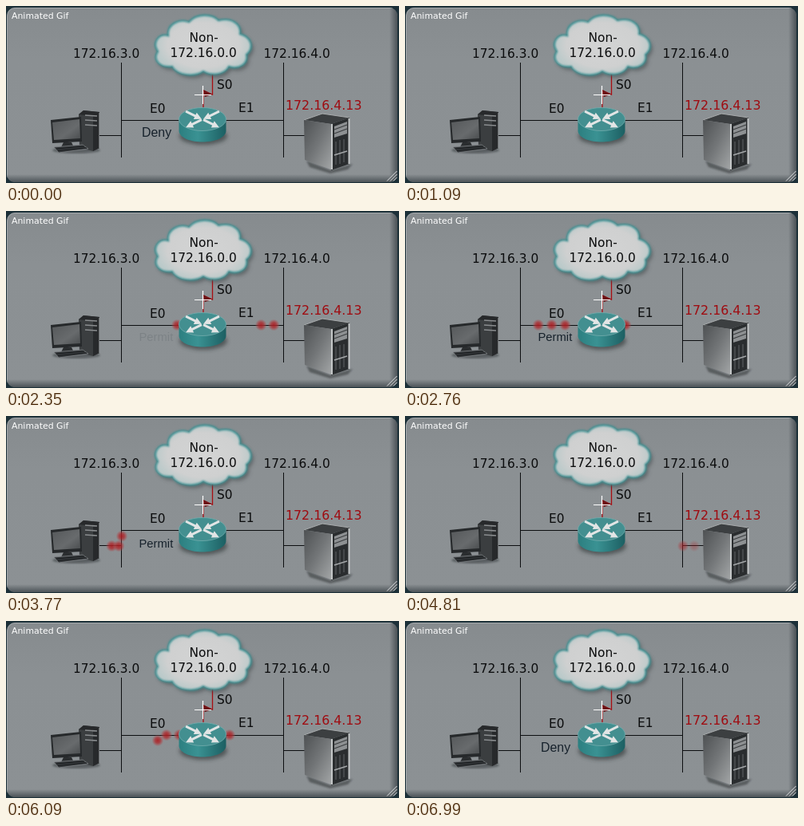
These frames come from a looping animation (492 px wide and 222 px high, 7.29 s). An HTML page:

```html
<!DOCTYPE html>
<html lang="en">
<head>
<meta charset="utf-8">
<title>Access list on E0</title>
<style>
  html, body { margin: 0; width: 100%; height: 100%; overflow: hidden; background: #1c3038; }
  svg { display: block; width: 492px; height: 222px; }
  text { font-family: "DejaVu Sans", Verdana, sans-serif; font-size: 15.4px; fill: #0c0d0e; }
  .verdict { font-family: "Liberation Sans", Arial, sans-serif; font-size: 15.9px; fill: #17222c; }
  .wire { fill: none; stroke: #0c0e10; stroke-width: 1; }
  .route { fill: none; stroke: none; }
</style>
</head>
<body>
<svg viewBox="0 0 492 222" xmlns="http://www.w3.org/2000/svg">
  <defs>
    <linearGradient id="panel" x2="0" y2="1">
      <stop offset="0" stop-color="#868b8e"/>
      <stop offset=".3" stop-color="#8b9093"/>
      <stop offset="1" stop-color="#8c9194"/>
    </linearGradient>
    <linearGradient id="edgeRight">
      <stop offset="0" stop-color="#2e363b" stop-opacity="0"/>
      <stop offset="1" stop-color="#2e363b" stop-opacity=".75"/>
    </linearGradient>
    <linearGradient id="edgeBottom" x2="0" y2="1">
      <stop offset="0" stop-color="#2e363b" stop-opacity="0"/>
      <stop offset="1" stop-color="#2e363b" stop-opacity=".75"/>
    </linearGradient>
    <clipPath id="panelShape"><rect x="1" y="2" width="489" height="219" rx="10"/></clipPath>
    <radialGradient id="puff">
      <stop offset="0" stop-color="#d3d4d4"/>
      <stop offset=".75" stop-color="#cfd0d0"/>
      <stop offset="1" stop-color="#bccaca"/>
    </radialGradient>
    <linearGradient id="drum">
      <stop offset="0" stop-color="#2c7f80"/>
      <stop offset=".4" stop-color="#3a9293"/>
      <stop offset="1" stop-color="#1c5f62"/>
    </linearGradient>
    <linearGradient id="screen" x2="1" y2="1">
      <stop offset="0" stop-color="#55585a"/>
      <stop offset=".6" stop-color="#686b6d"/>
      <stop offset="1" stop-color="#4a4d4f"/>
    </linearGradient>
    <linearGradient id="steel" x2="1" y2="1">
      <stop offset="0" stop-color="#4e5153"/>
      <stop offset=".5" stop-color="#737678"/>
      <stop offset="1" stop-color="#a2a5a6"/>
    </linearGradient>
    <radialGradient id="glow">
      <stop offset="0" stop-color="#ad1c21" stop-opacity=".9"/>
      <stop offset=".45" stop-color="#ae2a2e" stop-opacity=".75"/>
      <stop offset=".75" stop-color="#ad4044" stop-opacity=".4"/>
      <stop offset="1" stop-color="#a85a5d" stop-opacity="0"/>
    </radialGradient>
    <filter id="soft" x="-20%" y="-30%" width="140%" height="160%"><feGaussianBlur stdDeviation="2.5"/></filter>
    <filter id="slight" x="-10%" y="-10%" width="120%" height="120%"><feGaussianBlur stdDeviation="1"/></filter>
    <path id="cloud" d="M208 76C192 78 183 67 190 57C182 45 192 34 203 37C201 23 217 15 229 20C238 9 258 9 266 18C282 14 295 22 293 35C308 39 311 53 301 61C304 73 291 80 279 76C273 87 257 88 247 82C235 90 214 87 208 76Z"/>
  </defs>

  <rect width="492" height="222" fill="#1c3038"/>
  <g clip-path="url(#panelShape)">
    <rect width="492" height="222" fill="url(#panel)"/>
    <rect x="480" width="11" height="222" fill="url(#edgeRight)"/>
    <rect y="211" width="492" height="11" fill="url(#edgeBottom)"/>
    <rect x="1.500" y="2.500" width="496" height="226" rx="10" fill="none" stroke="#a4a9ac"/>
  </g>
  <path d="M477 219.500L489.500 207M481 219.500L489.500 211M485 219.500L489.500 215" stroke="#e4e6e7"/>
  <text x="7" y="16" style="font-size:10.9px;fill:#fff">Animated Gif</text>

  <path class="wire" d="M144.500 71V190M347.500 71V190M144 143.500H218M274 143.500H348M116 162.500H145M348 162.500H375"/>
  <path d="M258.500 84V111L247 106V130" fill="none" stroke="#a80d12" stroke-width="1.3"/>
  <path d="M247 105L258 111L249 114Z" fill="#6d1014"/>

  <path class="route" id="fromCloud" d="M258 84V111H247V143H145V163H116"/>
  <path class="route" id="fromNet" d="M348 64V143H145V163H116"/>
  <path class="route" id="fromServer" d="M380 163H348V143H196L188 152L178 160"/>
  <g id="dots"></g>

  <!-- cloud -->
  <use href="#cloud" x="3" y="4" fill="#3c4244" opacity=".55" filter="url(#soft)"/>
  <use href="#cloud" fill="url(#puff)"/>
  <use href="#cloud" fill="none" stroke="#3f9092" stroke-width="2.400" filter="url(#slight)"/>

  <!-- router -->
  <ellipse cx="247" cy="163" rx="30" ry="11" fill="#2a3133" opacity=".6" filter="url(#soft)"/>
  <path d="M216.500 142V157C219 175 273 175 275.500 157V142Z" fill="url(#drum)"/>
  <ellipse cx="246" cy="142" rx="29.500" ry="14.500" fill="#438f90" stroke="#74aeae" stroke-width=".8"/>
  <g id="arrows" fill="#e2e5e5"></g>

  <!-- workstation -->
  <ellipse cx="88" cy="181" rx="30" ry="4" fill="#24282b" opacity=".45" filter="url(#slight)"/>
  <path d="M91 136L97 131L117 133V178L109 182L92 178Z" fill="#3b3e40"/>
  <path d="M97 131L117 133V178L109 182V138L91 136Z" fill="#27292b"/>
  <path d="M99 137L114 138M99 143L114 144M99 149L114 150" stroke="#8a8d8f" stroke-width="1.600"/>
  <path d="M116.500 134V178" stroke="#6c6f71"/>
  <path d="M56 143L94 139L95 170L58 172Z" fill="#26292b"/>
  <path d="M58 146L92 142L93 166L60 168Z" fill="url(#screen)"/>
  <path d="M72 171H82L85 177H69Z" fill="#2a2d2f"/>
  <path d="M60 177L96 174L103 179L66 184Z" fill="#34373a" stroke="#85898b" stroke-width=".7"/>
  <path d="M63 179L98 176M65 181.500L101 178" stroke="#15181a" stroke-width=".8"/>

  <!-- server -->
  <path d="M376 194L406 206L434 198L428 205L406 210L380 202Z" fill="#25292c" opacity=".5" filter="url(#slight)"/>
  <path d="M373 143L396 135L430 140L407 148Z" fill="#3c3f41"/>
  <path d="M373 143L396 135L430 140" fill="none" stroke="#a9acad"/>
  <path d="M373 143L407 148V205L374 193Z" fill="url(#steel)"/>
  <path d="M407 148L430 140V198L407 206Z" fill="#2a2d2f"/>
  <path d="M408 148V205M429.500 141V198" stroke="#c3c6c7" stroke-width="2"/>
  <path d="M411 151L427 145V160L411 165Z" fill="#8d9092"/>
  <path d="M411 155L427 149M411 160L427 154" stroke="#3a3d3f" stroke-width="1.200"/>
  <path d="M413 170V199M418 168V198M423 167V196" stroke="#55585a" stroke-width="1.300"/>
  <path d="M411 187L427 182" stroke="#a3a6a8" stroke-width="1.500"/>

  <text x="84" y="65">172.16.3.0</text>
  <text x="322.500" y="65">172.16.4.0</text>
  <text x="229.500" y="45">Non-</text>
  <text x="205.500" y="64">172.16.0.0</text>
  <text x="264" y="104">S0</text>
  <text x="180" y="133.500">E0</text>
  <text x="291" y="132.500">E1</text>
  <text x="350" y="129.500" style="font-size:15.8px;fill:#9f0c11">172.16.4.13</text>
  <text class="verdict" id="deny" x="170" y="164">Deny</text>
  <text class="verdict" id="permit" x="166.500" style="font-size:14.8px">Permit</text>
  <path d="M236 111.500H257M246.500 100V123" stroke="#fff" stroke-width="1.200"/>
</svg>
<script>
  const NS = "http://www.w3.org/2000/svg";
  const LOOP = 7290;
  const $ = id => document.getElementById(id);
  const clamp = x => Math.max(0, Math.min(1, x));
  const ramp = (t, a, b) => clamp((t - a) / (b - a));

  function add(parent, tag, attrs) {
    const el = document.createElementNS(NS, tag);
    for (const key in attrs) el.setAttribute(key, attrs[key]);
    return parent.appendChild(el);
  }

  for (const [x, y, angle] of [[235, 137, 26], [257, 137, 154], [235, 147.5, 154], [257, 147.5, 26]])
    add($("arrows"), "path", {
      d: "M-11-1.500H2V-4.500L11 0L2 4.500V1.500H-11Z",
      transform: `translate(${x} ${y}) rotate(${angle})`
    });

  // Runs of evenly spaced picture changes: first, last, count.
  const RUNS = [
    [320, 770, 4], [1090, 2070, 8], [2220, 3190, 8], [3320, 4330, 8],
    [4480, 5400, 7], [5540, 6570, 8], [6710, 6990, 3]
  ];

  function snap(t) {
    let held = 0;
    for (const [first, last, count] of RUNS) {
      if (t < first) break;
      const gap = (last - first) / (count - 1);
      held = first + gap * Math.min(count - 1, Math.floor((t - first) / gap + 0.27));
    }
    return held;
  }

  // Distance over which a packet fades in on each route.
  const FADE_IN = { fromCloud: 12, fromNet: 12, fromServer: 50 };
  const FADE_OUT = 14;

  // Each packet: route, reference time, distance then, speed in px/ms.
  const packets = [
    ["fromCloud", 1790, 38, 0.114],
    ["fromCloud", 1790, 33, 0.102],
    ["fromCloud", 1790, 28, 0.09],
    ["fromNet", 1790, 27, 0.142],
    ["fromNet", 1790, 11, 0.142],
    ["fromServer", 4787, 32, 0.135],
    ["fromServer", 4787, 18, 0.135],
    ["fromServer", 4787, 2, 0.135],
    ["fromServer", 4787, -61, 0.135]
  ].map(([id, at, dist, speed]) => ({
    route: $(id), at, dist, speed,
    fadeIn: FADE_IN[id],
    length: $(id).getTotalLength(),
    dot: add($("dots"), "circle", { r: 7.5, fill: "url(#glow)" })
  }));

  function draw(time) {
    const t = snap(time);
    for (const p of packets) {
      const s = p.dist + p.speed * (t - p.at);
      const pos = p.route.getPointAtLength(Math.max(0, Math.min(p.length, s)));
      p.dot.setAttribute("cx", pos.x);
      p.dot.setAttribute("cy", pos.y);
      p.dot.setAttribute("opacity", clamp(s / p.fadeIn) * clamp((p.length - s) / FADE_OUT));
    }
    const deny = t < 1090 ? 1 - ramp(t, 170, 770) : ramp(t, 6200, 6800);
    $("deny").setAttribute("opacity", deny);
    $("permit").setAttribute("opacity", ramp(t, 2300, 2760) * (1 - ramp(t, 4000, 4400)));
    $("permit").setAttribute("y", 163 + 2 * ramp(t, 2760, 3320));
  }

  const start = performance.now();
  function tick() {
    draw((performance.now() - start) % LOOP);
    requestAnimationFrame(tick);
  }
  tick();
</script>
</body>
</html>
```
